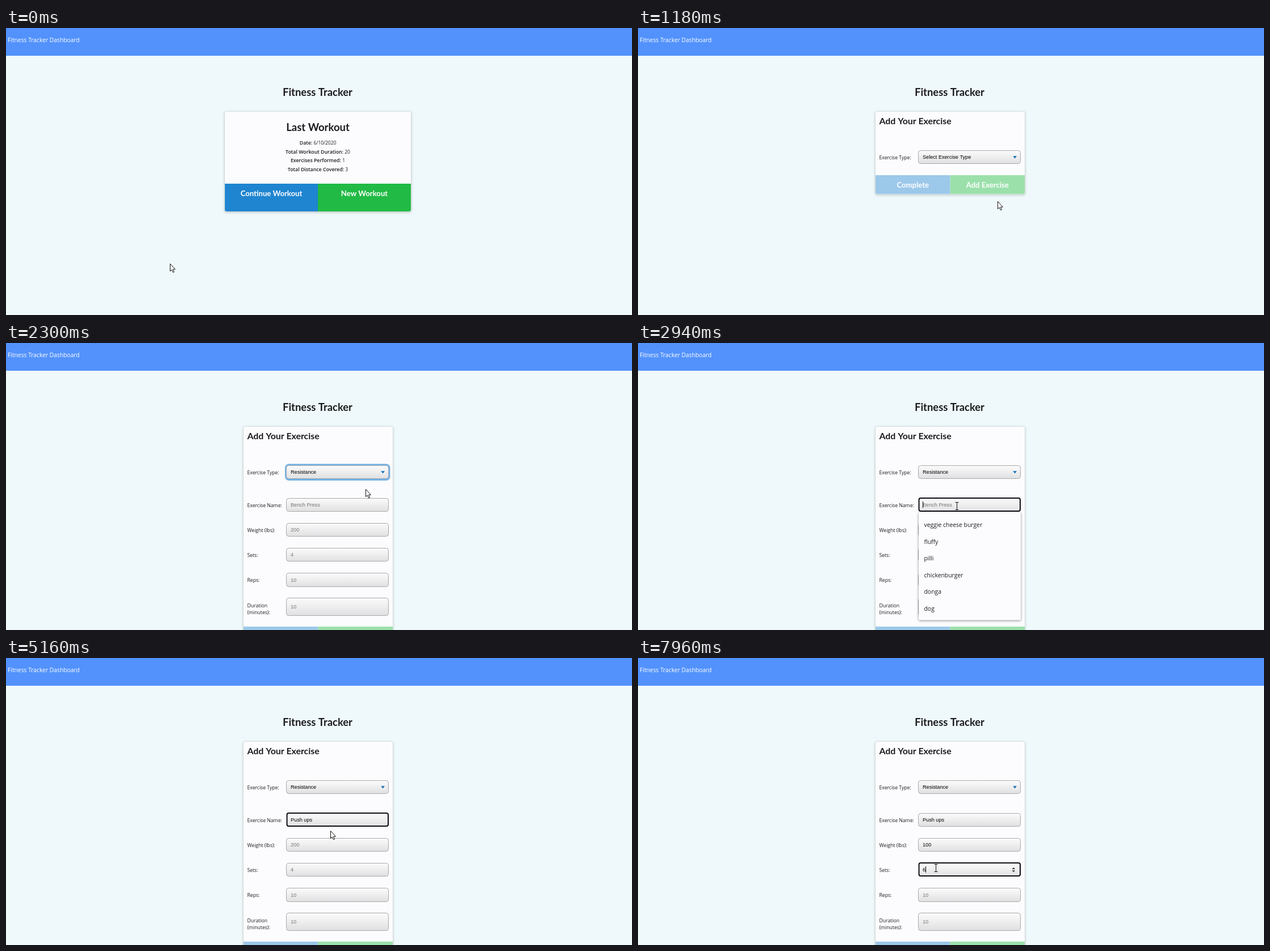
Animation, 1104 px wide and 507 px high, one loop 8000 ms. Source, as an HTML page with a canvas:

```html
<!DOCTYPE html>
<html lang="en">
<head>
<meta charset="utf-8">
<title>Workout form</title>
<style>
  html, body { margin: 0; width: 100%; height: 100%; overflow: hidden; background: #eff9fc; }
  canvas { display: block; width: 1104px; height: 507px; }
</style>
</head>
<body>
<canvas id="stage" width="1104" height="507"></canvas>
<script>
const ctx = document.getElementById('stage').getContext('2d');
const LOOP = 8000;
const LATO = 'Lato, sans-serif';
const UI = '"Open Sans", sans-serif';
const ARIAL = '"Liberation Sans", Arial, sans-serif';
const INK = '#1b1c1d';
const GREY = '#757575';

// Moments at which the page changes
const AT = {
  hover: 640, formPage: 1000, selectOpen: 1720, overOption: 2060, selectPick: 2200, formGrow: 2260,
  nameFocus: 2840, listOpen: 2880, listFilter: 3900, listClose: 4240,
  weightFocus: 5640, setsFocus: 7400
};

// Pointer route: time, x, y
const ROUTE = [
  [60, 289, 416], [660, 627, 324], [680, 627, 324], [820, 631, 315],
  [1060, 631, 315], [1640, 660, 233], [1920, 660, 233], [2140, 634, 258],
  [2300, 634, 258], [2800, 562, 288], [3000, 562, 288], [3180, 572, 305],
  [5320, 572, 305], [5740, 519, 334], [6740, 519, 334], [7060, 532, 388],
  [7160, 532, 388], [7520, 525, 371]
];

// Keystrokes per field
const KEYS = {
  name: ['Push ups', [3640, 4180, 4400, 4660, 4740, 4820, 4880, 4920]],
  weight: ['100', [6160, 6280, 6400]],
  sets: ['6', [7700]]
};
const CARET_OFF = [[3400, 3640], [5160, 5640], [5920, 6160], [6740, 7000]];

const within = (t, a, b) => t >= a && t < b;

function typed(field, t) {
  const [word, times] = KEYS[field];
  return word.slice(0, times.filter(k => t >= k).length);
}

function pointerAt(t) {
  const next = ROUTE.findIndex(p => p[0] > t);
  if (next === 0) return ROUTE[0].slice(1);
  if (next < 0) return ROUTE[ROUTE.length - 1].slice(1);
  const [t0, x0, y0] = ROUTE[next - 1];
  const [t1, x1, y1] = ROUTE[next];
  const u = (t - t0) / (t1 - t0);
  const e = u * u * (3 - 2 * u);
  return [x0 + (x1 - x0) * e, y0 + (y1 - y0) * e];
}

// Baselines sit on whole pixels to keep the type crisp
function text(str, x, y, font, color = INK, align = 'left') {
  ctx.font = font;
  ctx.fillStyle = color;
  ctx.textAlign = align;
  ctx.fillText(str, x, Math.round(y));
}

function rect(x, y, w, h, color) {
  ctx.fillStyle = color;
  ctx.fillRect(x, y, w, h);
}

function rounded(x, y, w, h, r) {
  ctx.beginPath();
  ctx.roundRect(x, y, w, h, r);
}

function polygon(points, fill, stroke) {
  ctx.beginPath();
  points.forEach(([x, y]) => ctx.lineTo(x, y));
  ctx.closePath();
  ctx.fillStyle = fill;
  ctx.fill();
  if (stroke) {
    ctx.strokeStyle = stroke;
    ctx.lineWidth = 1;
    ctx.stroke();
  }
}

function shadowBox(x, y, w, h, r, fill, shadow, blur, dy) {
  ctx.save();
  ctx.shadowColor = shadow;
  ctx.shadowBlur = blur;
  ctx.shadowOffsetY = dy;
  ctx.fillStyle = fill;
  rounded(x, y, w, h, r);
  ctx.fill();
  ctx.restore();
}

function card(x, y, w, h) {
  shadowBox(x - 0.5, y - 0.5, w + 1, h + 1, 3, '#d9dfd9', 'rgba(125,135,125,.5)', 4, 1);
  rounded(x, y, w, h, 3);
  ctx.fillStyle = '#fcfcff';
  ctx.fill();
}

function buttonPair(x, y, w, h, [left, right], [leftText, rightText], baseline) {
  ctx.save();
  rounded(x, y, w, h, [0, 0, 3, 3]);
  ctx.clip();
  rect(x, y, w / 2, h, left);
  rect(x + w / 2, y, w / 2, h, right);
  ctx.restore();
  const font = `bold 13.1px ${LATO}`;
  text(leftText, x + w / 4, baseline, font, '#fff', 'center');
  text(rightText, x + w * 0.75, baseline, font, '#fff', 'center');
}

function infoLine(label, value, y) {
  const bold = `600 8.8px ${UI}`, plain = `8.4px ${UI}`;
  ctx.font = bold;
  const lw = ctx.measureText(label + ' ').width;
  ctx.font = plain;
  const x = 550 - (lw + ctx.measureText(value).width) / 2;
  text(label, x, y, bold);
  text(value, x + lw, y, plain);
}

function homePage(t) {
  card(386, 148, 328, 176);
  text('Last Workout', 550, 182, `bold 18.5px ${LATO}`, INK, 'center');
  infoLine('Date:', '6/10/2020', 206);
  infoLine('Total Workout Duration:', '20', 221.5);
  infoLine('Exercises Performed:', '1', 237);
  infoLine('Total Distance Covered:', '3', 253);
  const green = t >= AT.hover ? '#16ab39' : '#21ba45';
  buttonPair(386, 275, 328, 49, ['#1f85d0', green], ['Continue Workout', 'New Workout'], 297);
}

function label(str, y) {
  text(str, 425.5, y, `8.65px ${UI}`);
}

function fieldBox(y, h, focus) {
  const fill = ctx.createLinearGradient(0, y, 0, y + h);
  fill.addColorStop(0, '#fbfbfc');
  fill.addColorStop(0.4, '#f1f1f2');
  fill.addColorStop(1, '#dfdfe1');
  if (focus) rounded(495.5, y, 178.5, h - 1, 3);
  else rounded(494.5, y + 0.5, 180, h - 1, 4);
  ctx.fillStyle = fill;
  ctx.fill();
  ctx.strokeStyle = focus ? '#0c0c14' : '#a9a9a9';
  ctx.lineWidth = focus ? 2 : 1;
  ctx.stroke();
}

function fieldText(str, y, color = '#000') {
  text(str, 502, y, `9.15px ${ARIAL}`, color);
}

function spinner(y) {
  polygon([[659.5, y - 1], [662.3, y - 4], [665.1, y - 1]], '#333');
  polygon([[659.5, y + 1.2], [662.3, y + 4.2], [665.1, y + 1.2]], '#333');
}

function input(y, h, value, hint, focus, t, number) {
  fieldBox(y, h, focus);
  const mid = y + h / 2;
  fieldText(value || hint, mid + 3.2, value ? '#000' : GREY);
  if (!focus) return;
  if (number) spinner(mid);
  if (!CARET_OFF.some(([a, b]) => within(t, a, b))) {
    rect(Math.round(502 + ctx.measureText(value).width), Math.round(mid - 6), 1, 11, '#000');
  }
}

function typeSelect(t) {
  const focus = within(t, AT.selectOpen, AT.nameFocus);
  if (focus) {
    rounded(494, 215.5, 181.5, 25.5, 5);
    ctx.strokeStyle = '#72b1e6';
    ctx.lineWidth = 4;
    ctx.stroke();
  }
  fieldBox(216, 24, false);
  fieldText(t >= AT.selectPick ? 'Resistance' : 'Select Exercise Type', 231.4);
  polygon([[661.3, 226.2], [668, 226.2], [664.7, 230.6]], '#0d6fb8');
}

function optionList(t) {
  shadowBox(495, 240, 179, 37, 0, '#fff', 'rgba(0,0,0,.5)', 5, 2);
  const active = t >= AT.overOption ? 1 : 0;
  rect(495.5, 241 + active * 11.7, 178, 11.6, '#c8c8c8');
  ctx.strokeStyle = '#767676';
  ctx.lineWidth = 1;
  ctx.strokeRect(495.5, 240.5, 178, 36);
  fieldText('Select Exercise Type', 249.5, '#858585');
  fieldText('Resistance', 261);
  fieldText('Cardio', 272.5);
}

function suggestions(t) {
  const all = ['veggie cheese burger', 'fluffy', 'pilli', 'chickenburger', 'donga', 'dog'];
  const shown = t < AT.listFilter ? all : all.filter(s => s[0] === 'p');
  const step = 29.5;
  shadowBox(495, 299.5, 180, 13 + shown.length * step, 2, '#fcfcfe', 'rgba(0,0,0,.45)', 4, 1);
  shown.forEach((s, i) => text(s, 504.5, 325 + i * step, `500 10.4px ${UI}`));
}

function formPage(t) {
  const grown = t >= AT.formGrow;
  card(419, 148, 263, grown ? 390 : 145.5);
  text('Add Your Exercise', 425.5, 170, `bold 15.85px ${LATO}`);
  label('Exercise Type:', 232);
  const labels = ['Complete', 'Add Exercise'];
  const pale = ['#9cc8ea', '#9be0ab'];
  const top = grown ? 501 : 260;
  buttonPair(419, top, 263, 33.5, pale, labels, top + 22);
  typeSelect(t);
  if (grown) {
    label('Exercise Name:', 290);
    label('Weight (lbs):', 334);
    label('Sets:', 378);
    label('Reps:', 422);
    label('Duration', 467);
    label('(minutes):', 479);
    input(274, 24, typed('name', t), 'Bench Press', within(t, AT.nameFocus, AT.weightFocus), t);
    input(318, 24, typed('weight', t), '200', within(t, AT.weightFocus, AT.setsFocus), t, true);
    input(362, 24, typed('sets', t), '4', t >= AT.setsFocus, t, true);
    input(406, 25, '', '10', false, t);
    input(450, 32, '', '10', false, t);
  }
  if (within(t, AT.selectOpen, AT.selectPick)) optionList(t);
  if (within(t, AT.listOpen, AT.listClose)) suggestions(t);
}

function arrow() {
  polygon([[0.5, 0.5], [0.5, 13.6], [3.4, 11], [5.5, 15.8], [7.6, 14.9], [5.5, 10.2], [9.4, 10.2]], '#fff', '#111');
}

function beam() {
  ctx.strokeStyle = '#111';
  ctx.lineWidth = 1;
  ctx.beginPath();
  for (const s of [-1, 1]) {
    ctx.moveTo(-2.5, s * 6.5);
    ctx.lineTo(3.5, s * 6.5);
  }
  ctx.moveTo(0.5, -6.5);
  ctx.lineTo(0.5, 6.5);
  ctx.stroke();
}

function hand() {
  ctx.beginPath();
  ctx.moveTo(-1.5, 11);
  ctx.lineTo(-1.5, 1);
  ctx.quadraticCurveTo(0, -1.4, 1.5, 1);
  ctx.lineTo(1.5, 6);
  ctx.quadraticCurveTo(3.2, 5, 4.3, 6.8);
  ctx.quadraticCurveTo(6, 6, 6.8, 7.8);
  ctx.quadraticCurveTo(8.8, 7.2, 8.8, 9.5);
  ctx.lineTo(8.5, 13.5);
  ctx.lineTo(6.8, 18.5);
  ctx.lineTo(-1, 18.5);
  ctx.lineTo(-5.5, 11.5);
  ctx.quadraticCurveTo(-5, 8.6, -1.5, 11);
  ctx.closePath();
  ctx.fillStyle = '#fff';
  ctx.fill();
  ctx.strokeStyle = '#111';
  ctx.lineWidth = 1.1;
  ctx.moveTo(1.5, 6);
  ctx.lineTo(1.5, 9.5);
  ctx.moveTo(4.3, 6.8);
  ctx.lineTo(4.3, 10);
  ctx.moveTo(6.8, 7.8);
  ctx.lineTo(6.8, 10.5);
  ctx.stroke();
}

function pointer(t) {
  const [x, y] = pointerAt(t);
  const overInput = t >= AT.formGrow && x > 495 && x < 675 &&
    [274, 318, 362, 406].some(top => within(y, top, top + 24.5));
  const draw = within(t, AT.hover, AT.formPage) ? hand : overInput ? beam : arrow;
  ctx.save();
  ctx.translate(Math.round(x), Math.round(y));
  draw();
  ctx.restore();
}

function render(t) {
  rect(0, 0, 1104, 507, '#eff9fc');
  rect(0, 0, 1104, 49, '#5392fc');
  text('Fitness Tracker Dashboard', 3, 25, `500 10.3px ${UI}`, '#fff');
  text('Fitness Tracker', 549.5, 120, `bold 18.4px ${LATO}`, INK, 'center');
  if (t < AT.formPage) homePage(t);
  else formPage(t);
  pointer(t);
}

const start = performance.now();
function frame() {
  render((performance.now() - start) % LOOP);
  requestAnimationFrame(frame);
}
frame();
</script>
</body>
</html>
```
